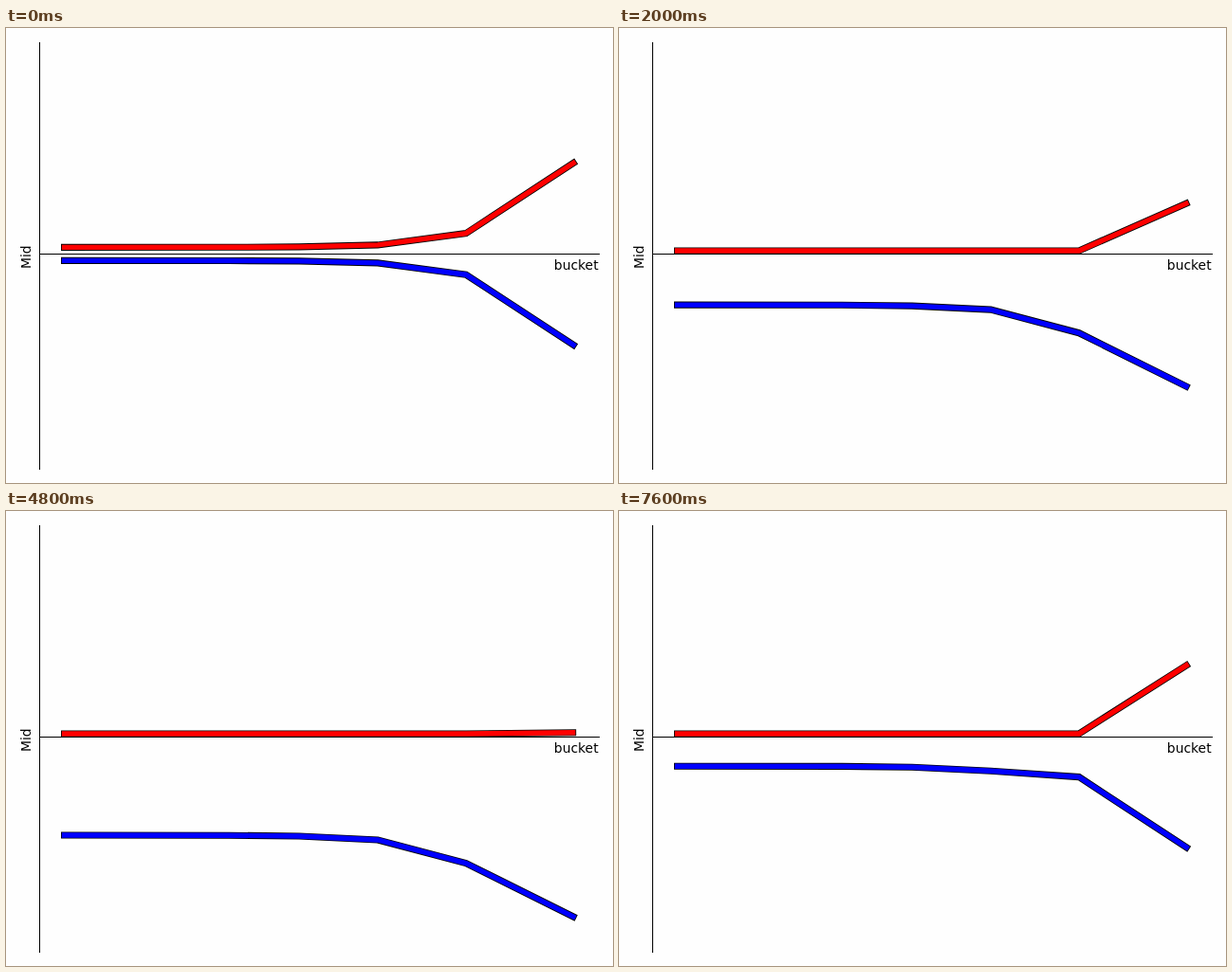
Animation, 640 px wide and 480 px high, one loop 8 s. Source, as an HTML page:

```html
<!DOCTYPE html>
<html lang="en">
<head>
<meta charset="utf-8">
<title>Bucket spread</title>
<style>
  html, body { margin: 0; width: 100%; height: 100%; overflow: hidden; background: #fefefe; }
  svg { display: block; width: 640px; height: 480px; }
  polyline { fill: none; stroke-linejoin: miter; }
  .edge { stroke: #000; stroke-width: 7.1; }
  .core { stroke-width: 5.4; }
  .axis { stroke: #000; stroke-width: 1; }
  text { font: 13.89px "DejaVu Sans", sans-serif; }
</style>
</head>
<body>
<svg viewBox="0 0 640 480">
  <g id="upper"><polyline class="edge"/><polyline class="core" stroke="#f00"/></g>
  <g id="lower"><polyline class="edge"/><polyline class="core" stroke="#00f"/></g>
  <path class="axis" d="M35.5 15V466M35 238.5H626"/>
  <text x="624.6" y="255" text-anchor="end">bucket</text>
  <text transform="translate(26 241.7) rotate(-90)" text-anchor="middle">Mid</text>
</svg>
<script>
const STEP = 400, STEPS = 20;
const MID = 238.4, MIN_GAP = 3.4;
const xs = [58, 235, 309, 392, 485, 601.2];
const halves = [7, 7.1, 7.5, 9.5, 21.8, 97.9];

// Vertical skew in pixels: rises, turns, falls.
function skewAt(n) {
  return n === 0 ? 0 : Math.min(1.9 + 10.35 * (n - 1), 20.4 + 10.4 * (19 - n));
}

const upperY = (h, s) => MID - Math.max(MIN_GAP, h - s);
const lowerY = (h, s) =>
  MID + Math.max(s + h, Math.min(2 * s, s + 2 * h - 3.6));

// Shorten both ends so the dark edge also shows at the tips.
function trim(pts, d) {
  const pull = (a, b) => {
    const k = d / Math.hypot(b[0] - a[0], b[1] - a[1]);
    return [a[0] + (b[0] - a[0]) * k, a[1] + (b[1] - a[1]) * k];
  };
  const last = pts.length - 1;
  return [pull(pts[0], pts[1]), ...pts.slice(1, last), pull(pts[last], pts[last - 1])];
}

function plot(id, rule, s) {
  const pts = xs.map((x, i) => [x, rule(halves[i], s)]);
  const [edge, core] = document.getElementById(id).children;
  edge.setAttribute("points", pts.join(" "));
  core.setAttribute("points", trim(pts, 0.85).join(" "));
}

let shown = -1;
function draw(n) {
  if (n === shown) return;
  shown = n;
  const s = skewAt(n);
  plot("upper", upperY, s);
  plot("lower", lowerY, s);
}

let start;
function tick(now) {
  start ??= now;
  draw(Math.floor(Math.max(0, now - start) / STEP) % STEPS);
  requestAnimationFrame(tick);
}
draw(0);
requestAnimationFrame(tick);
</script>
</body>
</html>
```
